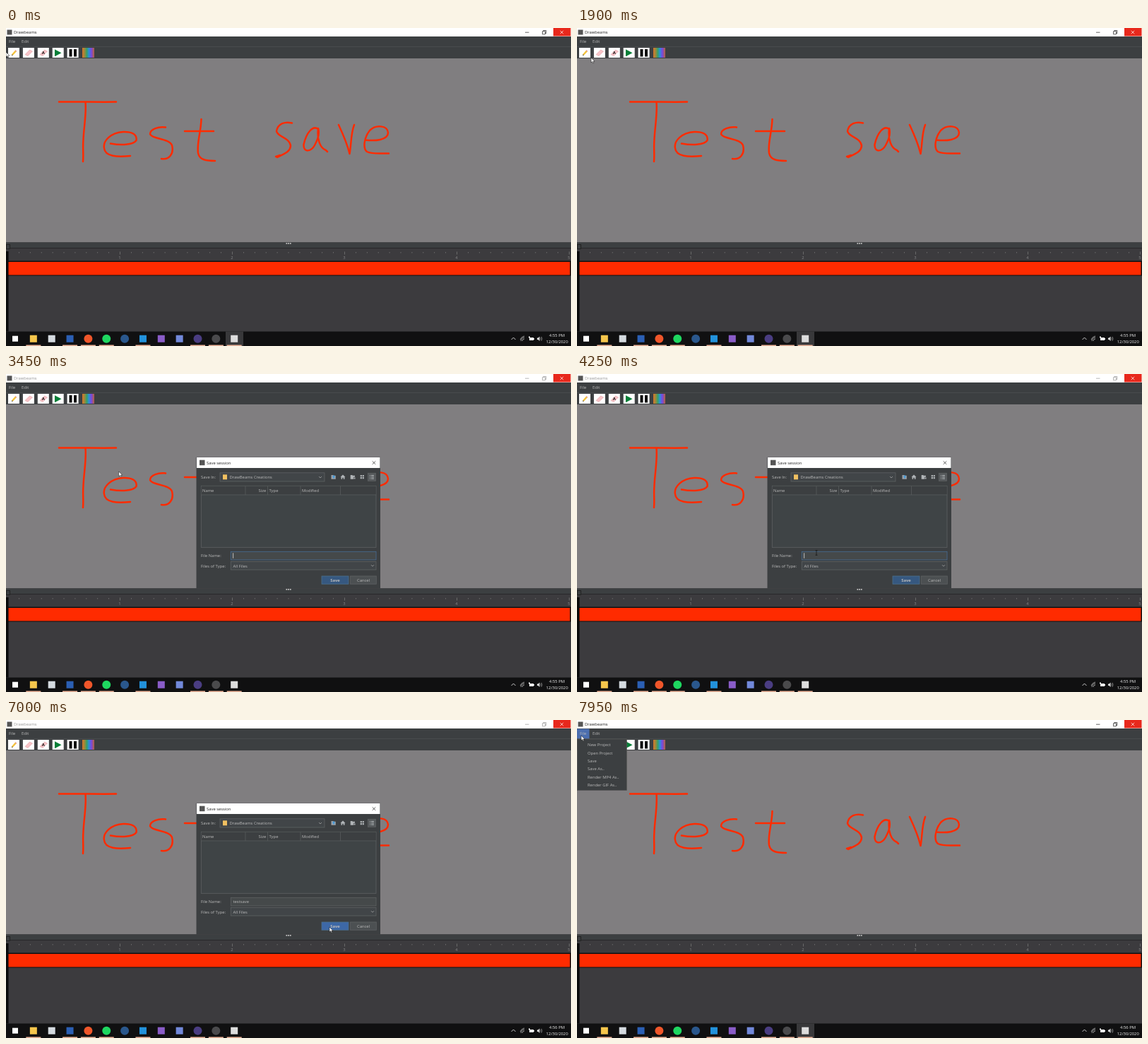
These frames come from a looping animation (800 by 450 pixels, 8 s). An HTML page:

```html
<!DOCTYPE html>
<html lang="en">
<head>
<meta charset="utf-8">
<title>Drawbeams</title>
<style>
html, body { margin: 0; width: 100%; height: 100%; overflow: hidden; background: #3c3f41; }
svg { display: block; width: 100vw; height: 100vh; }
text { font-family: "Open Sans", "Noto Sans", sans-serif; font-size: 5.85px; fill: #bbb; white-space: pre; }
</style>
</head>
<body>
<svg id="stage" viewBox="0 0 800 450" preserveAspectRatio="none">
  <defs>
    <linearGradient id="rainbow">
      <stop offset="0" stop-color="#d8742c"/><stop offset=".2" stop-color="#9a8a3c"/>
      <stop offset=".38" stop-color="#35a06a"/><stop offset=".55" stop-color="#2c8fd8"/>
      <stop offset=".75" stop-color="#7a48e0"/><stop offset="1" stop-color="#b8603c"/>
    </linearGradient>
  </defs>
</svg>
<script>
const LOOP = 8000;
const stage = document.getElementById('stage');

function add(parent, tag, attrs, text) {
  const el = document.createElementNS(stage.namespaceURI, tag);
  for (const k in attrs) el.setAttribute(k, attrs[k]);
  if (text !== undefined) el.textContent = text;
  parent.appendChild(el);
  return el;
}
const rect = (p, x, y, width, height, fill, more) => add(p, 'rect', { x, y, width, height, fill, ...more });
const line = (p, d, stroke, w = 1, more) => add(p, 'path', { d, stroke, 'stroke-width': w, fill: 'none', ...more });
const shape = (p, d, fill, more) => add(p, 'path', { d, fill, ...more });
const label = (p, x, y, s, more) => add(p, 'text', { x, y, ...more }, s);
const group = (p = stage) => add(p, 'g', {});
const show = (el, on) => el.setAttribute('display', on ? 'inline' : 'none');

// Window frame
rect(stage, 0, 0, 800, 12, '#fff');
rect(stage, 1.5, 2.5, 7, 7, '#555');
const title = label(stage, 11, 8.3, 'Drawbeams');
const controls = line(stage, 'M735 6.2h5.500M759.500 4.800h4v4h-4zM760.800 4.800v-1.300h4v4h-1.300', '#222', .7);
rect(stage, 775, 0, 24.5, 11.5, '#e8281c');
line(stage, 'M784.700 3.800l4.500 4.500m0-4.500l-4.500 4.500', '#fff', .7);
rect(stage, 0, 12, 800, 31, '#3c3f41');
rect(stage, 0, 26, 800, 1, '#484b4d');
const fileTab = rect(stage, 0, 12.5, 17.5, 14, '#4b6eaf');
label(stage, 4, 21.2, 'File');
label(stage, 22, 21.2, 'Edit');

// Toolbar
for (let i = 0; i < 5; i++) rect(stage, 3 + i * 20.9, 28, 16, 14, '#fff');
shape(stage, 'M8 39l.700-2.600 4.400-5 1.900 1.700-4.500 5z', '#f3c33c');
shape(stage, 'M8 39l.500-1.800 1.300 1.200z', '#333');
shape(stage, 'M12.600 32l.900-1 1.900 1.700-.800 1z', '#e8a0a0');
const eraser = x => shape(stage, `M${x} 37.500l6.500-6.500 4 2-6.500 6.500z`, '#f7c4c8', { stroke: '#dc9298', 'stroke-width': .5 });
eraser(27);
eraser(48);
label(stage, 50.8, 37.3, 'A', { style: 'font-weight:bold;fill:#111' });
shape(stage, 'M69 30.200l9.500 5-9.500 5z', '#087f38');
rect(stage, 89.5, 30, 4, 10.5, '#080808');
rect(stage, 96, 30, 4, 10.5, '#080808');
rect(stage, 108, 28, 17, 14, 'url(#rainbow)');

// Drawing area
rect(stage, 0, 43, 800, 260.5, '#807e80');
const strokes = [
  'M75 104.500C100 104 130 105 156 104.500M112.500 105C114 122 110 142 109.500 158C108.500 170 110 180 109 189',
  'M148 163.500C162 166 180 166 184.500 159C186 150 177 146.500 166 147C148 148 137 160 139 170C140 182 158 183 176 181',
  'M226 140.500C216 139 204 143 204 150C206 157 231 156 235 166C238 178 231 187 220 185',
  'M253 146H294M276.500 129C276 148 270 162 272 177C274 187 284 188 296 188',
  'M405 134.500C395 132 385 135 383 146C384 154 402 155 403 167C402 176 393 178 384 183L382 182L388 180',
  'M442 143C434 137 425 149 421.500 165C421 177 432 175 437 166C442 157 444 148 442 142C440 158 445 170 453 173L455 175',
  'M471 137C477 150 483 163 486.500 178C489 165 488 150 493 137',
  'M509 158.500C522 160 541 159 541 148C540 138 524 136 515 145C507 155 505 170 511 175C519 179 531 177 542 177.500'
];
line(stage, strokes.join(''), '#ff2b00', 2.5, { 'stroke-linecap': 'round', 'stroke-linejoin': 'round' });

// Timeline
rect(stage, 0, 303.5, 800, 126, '#3c3b3e');
rect(stage, 0, 303.5, 800, 8, '#3c3f41');
rect(stage, 0, 311, 800, .8, '#232425');
for (let i = 0; i < 3; i++) rect(stage, 396.5 + i * 2.7, 304, 1.7, 1.7, '#ccc');
for (let i = 1; i <= 50; i++) {
  const x = 2.5 + i * 15.9;
  if (i % 10) rect(stage, x - .4, 317, .8, 1.5, '#777');
  else {
    rect(stage, x - .4, 316.5, .8, 4, '#777');
    label(stage, x - .5, 326.5, i / 10, { 'text-anchor': 'middle', style: 'fill:#888' });
  }
}
rect(stage, 0, 329.5, 800, 21, '#111');
rect(stage, 3, 331, 795.5, 18.5, '#ff2b00');
rect(stage, 0, 316, 3.5, 113.5, '#0b0b0b');
rect(stage, .5, 306.5, 5, 6, '#3c3f41', { stroke: '#1d1d1d', 'stroke-width': .8 });

// Taskbar
rect(stage, 0, 429.5, 800, 20.5, '#101011');
const activeTile = rect(stage, 311, 429.5, 25, 20.5, '#38383a');
const icons = [
  ['#fff', 0, 0], ['#f6c64c', 0, 1], ['#d5dbe0', 0, 0], ['#2b5fb4', 0, 1], ['#f0562a', 1, 1],
  ['#1ed760', 1, 1], ['#2a578c', 1, 0], ['#2292dc', 0, 1], ['#8a5cc8', 0, 0], ['#7289da', 0, 0],
  ['#4a3d82', 1, 1], ['#4a4a4c', 1, 1], ['#ddd', 0, 1]
];
icons.forEach(([color, round, open], i) => {
  const x = 13 + i * 25.85;
  if (round) add(stage, 'circle', { cx: x, cy: 439.7, r: 6, fill: color });
  else {
    const s = i ? 10 : 8;
    rect(stage, x - s / 2, 439.7 - s / 2, s, s, color);
  }
  if (open) rect(stage, x - 10.5, 448.5, 21, 1.5, '#eeb49a');
});
line(stage, 'M715.500 441l3-3 3 3', '#ddd', .9);
line(stage, 'M729 443a5.500 5.500 0 0 1 5-5M731 443a3 3 0 0 1 3-3M728 441a8 8 0 0 1 6-5', '#bbb', .8);
shape(stage, 'M741 438h6v4h-6zM747 439h1v2h-1zM740 436.500h2v2h-2z', '#eee');
shape(stage, 'M752 438.500h1.500l2-2v6.500l-2-2H752z', '#ddd');
line(stage, 'M756.800 438q1.200 1.700 0 3.500M758 436.800q2.200 3 0 6', '#bbb', .6);
const bright = { 'text-anchor': 'middle', style: 'fill:#f2f2f2' };
const clock = label(stage, 780, 437.3, '', bright);
label(stage, 780.3, 446.2, '12/30/2020', bright);

// File menu
const menu = group();
rect(menu, .3, 27, 70, 72.5, '#3c3f41', { stroke: '#555', 'stroke-width': .7 });
const menuMark = rect(menu, .5, 0, 69.5, 11.2, '#4b6eaf');
const rowY = i => 29.3 + i * 11.42;
['New Project', 'Open Project', 'Save', 'Save As..', 'Render MP4 As..', 'Render GIF As..']
  .forEach((s, i) => label(menu, 15, rowY(i) + 7.8, s));

// Save dialog
const dialog = group();
const box = (x, y, w, h, fill, stroke = '#5e6163') => rect(dialog, x, y, w, h, fill, { stroke, 'stroke-width': .8 });
const arrow = (x, y) => line(dialog, `M${x - 2} ${y - 1}l2 2 2-2`, '#a5a5a5', .8);
rect(dialog, 269.5, 117.8, 260.5, 185.7, '#3c3f41');
rect(dialog, 270, 118, 259.5, 15, '#fff');
rect(dialog, 274, 121.7, 7.5, 7.5, '#555');
label(dialog, 284, 127.7, 'Save session', { style: 'fill:#222' });
line(dialog, 'M518.700 123.300l4.600 4.600m0-4.600l-4.600 4.600', '#222', .7);
label(dialog, 276, 147.8, 'Save In:');
box(303, 139.8, 148, 12.2, '#414548');
rect(dialog, 307, 142.3, 6, 7, '#f0c060');
label(dialog, 316.5, 147.8, 'DrawBeams Creations');
arrow(445, 146);
shape(dialog, 'M460.500 143h2.500l.800.800h3v5h-6.300z', '#9da3a8');
shape(dialog, 'M464 143l2.500 2.500h-1.500v2h-2v-2h-1.500z', '#4a9ad8');
shape(dialog, 'M477 142.500l3.500 3.300h-1v3h-1.700v-2h-1.600v2h-1.700v-3h-1z', '#b0b4b7');
shape(dialog, 'M487.700 143h2.500l.800.800h3v2h-2v3h-4.300zM492.500 146.500h2v2h-2z', '#b0b4b7');
shape(dialog, 'M501.700 143h2.200v2.200h-2.200zm3 0h2.200v2.200h-2.200zm-3 3h2.200v2.200h-2.200zm3 0h2.200v2.200h-2.200z', '#b0b4b7');
box(512.5, 140.3, 11, 11, '#54585a');
line(dialog, 'M515 143.500h1m1 0h4m-6 2.300h1m1 0h4m-6 2.300h1m1 0h4', '#c0c4c7', .9);
box(276.3, 158.3, 247.7, 87, '#3f4446');
rect(dialog, 276.7, 158.7, 247, 12, '#3c3f41');
line(dialog, 'M276.300 171H524M339 158.500V171M370.500 158.500V171M417 158.500V171M473.500 158.500V171', '#5b5f61', .7);
[[278, 'Name'], [357.5, 'Size'], [372.5, 'Type'], [419, 'Modified']].forEach(([x, s]) => label(dialog, x, 166.8, s));
label(dialog, 276, 259.2, 'File Name:');
const field = box(318.3, 251.3, 205.7, 11.7, '#45494a');
const typed = label(dialog, 321.5, 259.2, '');
const caret = rect(dialog, 321.3, 253.3, .8, 7.5, '#ddd');
label(dialog, 276, 273.5, 'Files of Type:');
box(318.3, 265.5, 205.7, 11.5, '#414548');
label(dialog, 321.5, 273.5, 'All Files');
arrow(519, 271.2);
const saveButton = box(447, 286, 38, 11.2, '#365880', '#4c708c');
label(dialog, 466, 293.9, 'Save', { 'text-anchor': 'middle', style: 'font-weight:bold' });
box(487.3, 286, 37, 11.2, '#4c5052');
label(dialog, 506, 293.9, 'Cancel', { 'text-anchor': 'middle' });

// Pointers
const pointer = shape(stage, 'M0 0v7l1.600-1.500 1.100 2.500 1.200-.500-1.100-2.400h2.200z', '#fff', { stroke: '#111', 'stroke-width': .5 });
const beam = line(stage, 'M-1.500-3.300h3M0-3.300v6.600M-1.500 3.300h3', '#111', .7);

// Pointer stops: time, x, y
const route = [
  [0, 0, 34], [50, 0, 34], [400, 190, 145], [700, 218, 158], [1350, 205, 152], [1900, 20, 42],
  [2250, 8, 20], [2450, 8, 20], [2900, 28, 60], [3150, 28, 60], [3750, 290, 215],
  [4200, 339, 253], [6400, 339, 253], [6900, 458, 293], [7250, 458, 293], [7850, 6, 22], [8000, 6, 22]
];
function pointerAt(t) {
  const i = route.findIndex(stop => stop[0] > t);
  const [t0, x0, y0] = route[i - 1], [t1, x1, y1] = route[i];
  const k = (t - t0) / (t1 - t0), e = k * k * (3 - 2 * k);
  return [x0 + (x1 - x0) * e, y0 + (y1 - y0) * e];
}

function draw(t) {
  const [x, y] = pointerAt(t);
  const menuOpen = (t >= 2350 && t < 3150) || t >= 7900;
  const saving = t >= 3250 && t < 7150;
  show(menu, menuOpen);
  show(fileTab, menuOpen);
  const row = Math.floor((y - rowY(0)) / 11.42);
  show(menuMark, row >= 0 && row < 6);
  menuMark.setAttribute('y', rowY(Math.max(row, 0)));

  show(dialog, saving);
  show(activeTile, !saving);
  title.style.fill = saving ? '#999' : '#222';
  controls.setAttribute('stroke', saving ? '#999' : '#222');

  const name = 'testsave'.slice(0, Math.max(0, Math.floor((t - 4650) / 170)));
  const focus = t < 6950;
  if (typed.textContent !== name) typed.textContent = name;
  const end = saving && name ? typed.getComputedTextLength() : 0;
  caret.setAttribute('x', 321.3 + end);
  show(caret, focus && (t - 4100 + LOOP) % 1000 < 500);
  field.setAttribute('stroke', focus ? '#466d94' : '#5e6163');
  saveButton.setAttribute('fill', focus ? '#365880' : '#3d68a6');
  clock.textContent = t < 5500 ? '4:55 PM' : '4:56 PM';

  const inField = saving && x > 318 && x < 524 && y > 251 && y < 263;
  show(pointer, !inField);
  show(beam, inField);
  (inField ? beam : pointer).setAttribute('transform', `translate(${x} ${y})`);
}

const start = performance.now();
function tick() {
  draw((performance.now() - start) % LOOP);
  requestAnimationFrame(tick);
}
tick();
</script>
</body>
</html>
```
